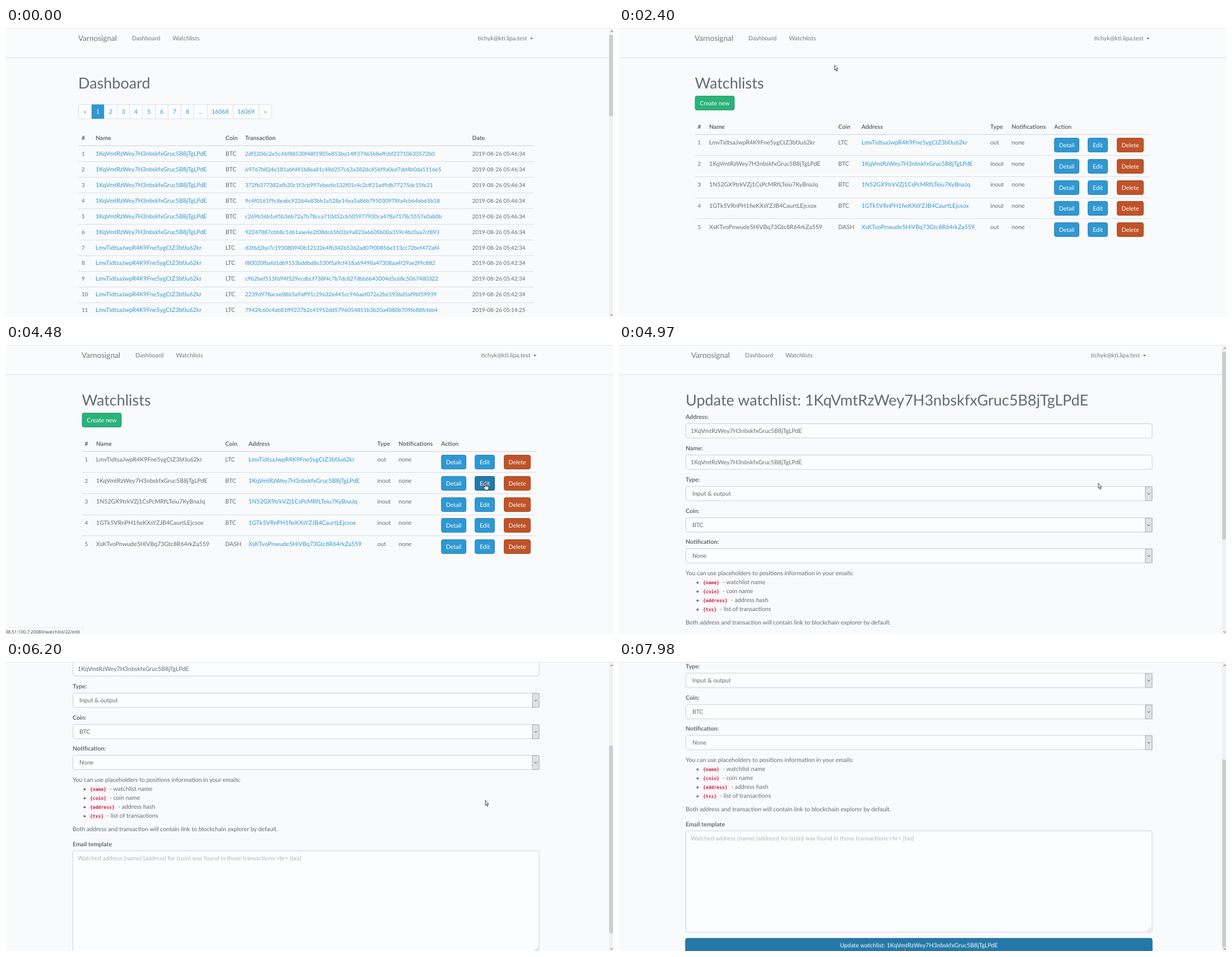
These frames come from a looping animation (1084 px wide and 516 px high, 8000 ms). An HTML page:

```html
<!DOCTYPE html>
<html lang="en">
<head>
<meta charset="utf-8">
<title>Watchlist walkthrough</title>
<style>
html, body { margin: 0; width: 100%; height: 100%; overflow: hidden; background: #f8fafc; }
svg { display: block; width: 1084px; height: 516px; }
text { font: 10.6px Lato, "Open Sans", sans-serif; fill: #636b6f; white-space: pre; text-rendering: geometricPrecision; }
.mid { text-anchor: middle; }
.bold { font-weight: 700; }
.link { fill: #3097d1; }
.num { font-size: 9.9px; }
.hash { font-size: 9.9px; fill: #3097d1; }
.nav { fill: #777; }
.dark { fill: #333; }
.brand { font-size: 13.6px; fill: #777; }
.h1 { font-size: 27px; }
.white { fill: #fff; }
.hint { fill: #b1b7ba; }
.code { font: bold 8.1px "DejaVu Sans Mono", monospace; fill: #c7254e; }
.status { font: 8px "Open Sans", "Noto Sans", sans-serif; fill: #444; }
.line { stroke: #dcdfe1; }
.field { fill: #fcfdfe; stroke: #ccd0d2; }
</style>
</head>
<body>
<svg id="stage" viewBox="0 0 1084 516"></svg>
<script>
const LOOP = 8000;
const rules = [];

// Registers stepped keyframes from [ms, css] pairs and returns the class name.
function anim(frames) {
  const name = 'k' + rules.length;
  const body = frames.map(([ms, css]) => `${ms / LOOP * 100}%{${css}}`).join('');
  rules.push(`@keyframes ${name}{${body}}.${name}{animation:${name} ${LOOP}ms step-end infinite}`);
  return name;
}
const show = (...spans) => anim([[0, 'opacity:0'],
  ...spans.flatMap(([on, off]) => [[on, 'opacity:1'], [off, 'opacity:0']])]);
const moveY = frames => anim(frames.map(([ms, y]) => [ms, `transform:translateY(${y}px)`]));

const esc = s => String(s).replace(/&/g, '&amp;').replace(/</g, '&lt;');
const group = (cls, ...parts) => `<g class="${cls}">${parts.flat(9).join('')}</g>`;
const text = (x, y, s, cls = '', drop = 3.8) => `<text x="${x}" y="${y + drop}" class="${cls}">${esc(s)}</text>`;
const rect = (x, y, w, h, attrs) => `<rect x="${x}" y="${y}" width="${w}" height="${h}" ${attrs}/>`;
const path = (d, attrs) => `<path d="${d}" ${attrs}/>`;
const rule = (x1, x2, y, w = 1) => path(`M${x1} ${y}H${x2}`, `class="line" stroke-width="${w}"`);
const button = (x, y, w, label, fill, edge) => [
  rect(x + .5, y + .5, w - 1, 25, `rx="3" fill="${fill}" stroke="${edge}"`),
  text(x + w / 2, y + 13, label, 'mid white')];
const blue = ['#3097d1', '#2a88bd'], navy = ['#2579a9', '#1f648b'], deep = ['#1f648b', '#133d55'];

const BTC = '1KqVmtRzWey7H3nbskfxGruc5B8jTgLPdE';
const LTC = 'LmvTidtsaJwpR4K9Fne5ygCtZ3bfJu62kr';

function navbar(dx, hover) {
  return [
    rect(0, -2, 1084, 55, 'fill="#fafbfd"'),
    path('M0 53H1084', 'stroke="#d9e1e7"'),
    text(129 + dx, 18.5, 'Varnosignal', 'brand', 4.6),
    text(225 + dx, 18.5, 'Dashboard', 'nav'),
    text(297.5 + dx, 18.5, 'Watchlists', 'nav'),
    hover ? group(hover, text(297.5 + dx, 18.5, 'Watchlists', 'dark')) : '',
    text(842.5 + dx, 18.5, 'tichyk@kti.lipa.test', 'nav'),
    path(`M${935.5 + dx} 17.5h6l-3 3z`, 'fill="#777"')];
}

function scrollbar(height, cls = '') {
  return [
    rect(1077, 1, 7, 515, 'fill="#f0f0f0"'),
    path('M1079.5 7.5l2.5-2.5 2.5 2.5M1079.5 511l2.5 2.5 2.5-2.5', 'fill="none" stroke="#505050"'),
    rect(1077, 12.5, 7, height, `fill="#cdcdcd" class="${cls}"`)];
}

const hover = show([830, 2330]);

function dashboard() {
  const edges = [129.5, 152.5, 175.5, 198.5, 220.5, 243.5, 266.5, 289.5, 312.5, 335.5, 359.5, 405.5, 451.5, 474.5];
  const pages = ['«', 1, 2, 3, 4, 5, 6, 7, 8, '...', 16068, 16069, '»'];
  const hashes = [
    '2df5206c2e5c46f88530f48f1905e853ba14ff37465b8effcbf23710633572b0',
    '69767b824e181abfd41b8ea81c48d257c63a382dc456f9a0ed7dd4b0da5116e5',
    '372fb377382afb20c1f3cb997ebecfe132f01c4c2cff21ad9db77275dc15fe21',
    '9c4f0161f9c8eabc92264e83bb1e528e14ea5a86b795030978fa4cb64ab65b18',
    'c269b56b1ef5b36b72a7b78cca710d52cb505977930ca478a7178c5557e0ab0b',
    '92247887cbb8c1d61aae4e2f08dc65b03a9a823a6605b00a359c4bc0aa7cf893',
    'd3f6d2be7c193080940b12132e4fb34265362ad07f00856e113cc72bef472af4',
    'f80020fbafd1db9153bddbd8c530f5a9cf418a69498a47308aa4f29ae2f9c882',
    'c9b2bef513f694f529ecdbcf738f4c7b7dc827dbb6b43004d5c68c5067480322',
    '2239d978acee0865a9aff91c29e32e445cc946aef072e2be5936d5af9bf59939',
    '7942fc60c4ab81ff9237b2c41952dd5796054851b3b20a4080b709fe88fcfeb4'];
  const row = (hash, i) => {
    const y = 224 + i * 27.95, early = i < 6;
    const time = early ? '05:46:34' : i < 10 ? '05:42:34' : '05:14:25';
    return [
      text(135, y, i + 1, 'num'),
      text(160, y, early ? BTC : LTC, 'link'),
      text(392, y, early ? 'BTC' : 'LTC'),
      text(427, y, hash, 'hash'),
      text(832.5, y, '2019-08-26 ' + time, 'num'),
      rule(130, 942, Math.round(y + 14) + .5)];
  };
  return [
    navbar(0, hover),
    text(129, 99, 'Dashboard', 'h1', 9),
    rect(129.5, 136.5, 345, 25.5, 'rx="3" fill="#fcfdfe" class="line"'),
    rect(152.5, 136.5, 23, 25.5, 'fill="#3097d1"'),
    edges.slice(1, -1).map(x => path(`M${x} 137v25`, 'class="line"')),
    pages.map((p, i) => text((edges[i] + edges[i + 1]) / 2, 149.5, p,
      'mid ' + (i == 0 || i == 9 ? 'nav' : i == 1 ? 'white' : 'link'))),
    [[135, '#'], [160, 'Name'], [392, 'Coin'], [427, 'Transaction'], [832.5, 'Date']]
      .map(([x, s]) => text(x, 196, s, 'bold')),
    rule(130, 942, 210.2, 1.6),
    hashes.map(row),
    scrollbar(144.5)];
}

function watchlists() {
  const rows = [
    [LTC, 'LTC', 'out'],
    [BTC, 'BTC', 'inout'],
    ['1N52GX9trkVZj1CsPcMRfLTeiu7KyBnaJq', 'BTC', 'inout'],
    ['1GTk5VRnPH1fieKXsYZJB4CaurtLEjcsox', 'BTC', 'inout'],
    ['XsKTvoPnwude5HiVBq73Gtc8R64rkZa559', 'DASH', 'out']];
  const row = ([hash, coin, type], i) => {
    const y = 204.3 + i * 37.6, top = Math.round(196.4 + i * 37.6);
    return [
      text(140.5, y, i + 1, 'num'),
      text(161, y, hash), text(391.5, y, coin), text(433, y, hash, 'link'),
      text(663, y, type), text(701, y, 'none'),
      button(777, top, 45, 'Detail', ...blue),
      button(837, top, 36, 'Edit', ...blue),
      button(889, top, 48, 'Delete', '#bf5329', '#aa4a24'),
      i < 4 ? rule(136, 948, Math.round(y + 23) + .5) : ''];
  };
  return [
    navbar(6, hover),
    text(135.5, 99, 'Watchlists', 'h1', 9),
    button(135.5, 121, 71, 'Create new', '#2ab27b', '#259d6d'),
    [[140.5, '#'], [161, 'Name'], [391.5, 'Coin'], [433, 'Address'], [663, 'Type'], [701, 'Notifications'], [777, 'Action']]
      .map(([x, s]) => text(x, 176, s, 'bold')),
    rule(136, 948, 190.2, 1.6),
    rows.map(row),
    group(show([3549, 3780]), button(777, 234, 45, 'Detail', ...navy)),
    group(show([3870, 4890]), button(837, 234, 36, 'Edit', ...navy))];
}

function editForm() {
  const fields = [['Address:', BTC], ['Name:', BTC], ['Type:', 'Input & output'], ['Coin:', 'BTC'], ['Notification:', 'None']];
  const field = ([label, value], i) => {
    const y = Math.round(i * 55.85), select = i > 1;
    return [
      text(119, y + 127.5, label, 'bold'),
      rect(119.5, y + 139.5, 832.5, 25.5, 'rx="3" class="field"'),
      text(select ? 131 : 128, y + 152, value),
      select ? [
        rect(940, y + 140, 12, 25, 'fill="#e1e1e1" stroke="#adadad"'),
        path(`M943.7 ${y + 151.5}l2.3 2.3 2.3-2.3`, 'fill="none" stroke="#444"')] : ''];
  };
  const marks = [['{name}', 'watchlist name', 185], ['{coin}', 'coin name', 185],
    ['{address}', 'address hash', 200], ['{txs}', 'list of transactions', 180]];
  const mark = ([code, note, x], i) => {
    const y = 422.5 + i * 16;
    return [
      `<circle cx="140.3" cy="${y + .8}" r="1.9" fill="#636b6f"/>`,
      rect(148, y - 5, code.length * 4.9 + 4, 12, 'rx="2" fill="#f9f2f4"'),
      text(150, y + .5, code, 'code', 3),
      text(x, y, '- ' + note)];
  };
  const submit = colors => button(118.5, 724.5, 834, 'Update watchlist: ' + BTC, ...colors);
  const scroll = [[0, 1], [5900, 0], [5970, -24], [6050, -81], [6120, -144], [6200, -196], [6270, -231.5]];
  return [
    group(moveY(scroll),
      group('', navbar(0)).replace('<g', '<g transform="translate(0 -1)"'),
      text(119, 98, 'Update watchlist: ' + BTC, 'h1', 9),
      fields.map(field),
      text(119, 406.5, 'You can use placeholders to positions information in your emails:'),
      marks.map(mark),
      text(119, 494.5, 'Both address and transaction will contain link to blockchain explorer by default.'),
      text(119, 521.3, 'Email template', 'bold'),
      rect(119.5, 533, 832.5, 181, 'rx="3" class="field"'),
      text(128, 545.7, 'Watched address {name} {address} for {coin} was found in those transactions:<br> {txs}', 'hint'),
      path('M944 712l6-6M947 712l3-3', 'stroke="#888" stroke-dasharray="1.5 1"'),
      submit(blue),
      group(show([7351, 8000]), submit(navy)),
      group(show([7813, 7897]), submit(deep))),
    scrollbar(334.5, moveY(scroll.map(([ms, y]) => [ms, Math.max(0, -y * .7)])))];
}

function statusBar() {
  const host = '98.51.100.7:20080/watchlist', fonts = 'fonts.larkdepot.test';
  return [
    [1070, 1610, 108, host],
    [1610, 1900, 183, 'Transferring data from 198.51.100.7…'],
    [1900, 2040, 183, 'Read ' + fonts],
    [2040, 2250, 268, `Transferring data from ${fonts}…`],
    [3640, 3780, 118, host + '/22'],
    [4480, 4970, 138, host + '/22/edit']
  ].map(([on, off, w, s]) => group(show([on, off]),
    rect(-2, 504.5, w + 1.5, 14, 'rx="1" fill="#f9fafc" stroke="#eceef0"'),
    text(-1, 512, s, 'status', 2.9)));
}

function cursor() {
  const stops = [[0, 'transform:translate(-40px,-40px)']];
  // Samples a polyline at evenly spaced moments.
  const move = (from, to, steps, ...pts) => {
    for (let i = 0; i < steps; i++) {
      const u = steps > 1 ? i / (steps - 1) : 0, pos = u * (pts.length - 1);
      const a = pts[Math.floor(pos)], b = pts[Math.ceil(pos)], f = pos % 1;
      const [x, y] = a.map((v, k) => (v + (b[k] - v) * f).toFixed(1));
      stops.push([from + (to - from) * u, `transform:translate(${x}px,${y}px)`]);
    }
  };
  move(280, 830, 8, [750, 272], [500, 180], [430, 95], [335, 18]);
  move(1290, 1380, 2, [335, 20], [336, 20]);
  move(1820, 1820, 1, [336, 24]);
  move(2250, 2870, 9, [341, 34], [428, 98], [540, 156], [650, 230], [662, 238]);
  move(3010, 3780, 11, [676, 240], [828, 242]);
  move(3870, 4040, 3, [842, 243], [855, 245]);
  move(4330, 4480, 3, [855, 245], [856, 246]);
  move(4890, 4890, 1, [855.5, 246.5]);
  move(6880, 7430, 8, [845, 262], [650, 405], [540, 480], [511, 503]);
  move(7730, 7980, 4, [511, 504], [511, 510]);
  const ink = 'fill="#fff" stroke="#222" stroke-width=".9" stroke-linejoin="round"';
  return group(anim(stops),
    group(show([280, 830], [2250, 3164], [3318, 3549], [3780, 3870], [4890, 7351]),
      path('M.4 .4V9.2L2.4 7.4 3.9 11 5.3 10.4 3.8 6.9H6.6Z', ink)),
    group(show([830, 2250], [3549, 3780], [3870, 4890], [7351, 8000]),
      path('M-1 1Q0-.4 1 1V5Q2.2 4.2 2.8 5.3 4 4.7 4.5 5.8 6 5.4 6 7V9.5Q6 11 5 13H0Q-1.5 10.5-3.4 8.2-3.6 6.7-2 7.3L-1 8.3ZM1 5v2.4M2.8 5.3v2.2M4.5 5.8v2', ink)),
    group(show([3164, 3318]),
      path('M-2.2-5H2.2M0-5V5M-2.2 5H2.2', 'fill="none" stroke="#333"')));
}

const parts = [
  rect(0, 0, 1084, 516, 'fill="#f8fafc"'),
  group(show([0, 1960]), dashboard()),
  group(show([1960, 4890]), watchlists()),
  group(show([4890, LOOP]), editForm()),
  path('M0 .5H1084', 'stroke="#e3e6e9"'),
  statusBar(),
  cursor()];
document.getElementById('stage').innerHTML = `<style>${rules.join('')}</style>` + parts.flat(9).join('');
</script>
</body>
</html>
```
